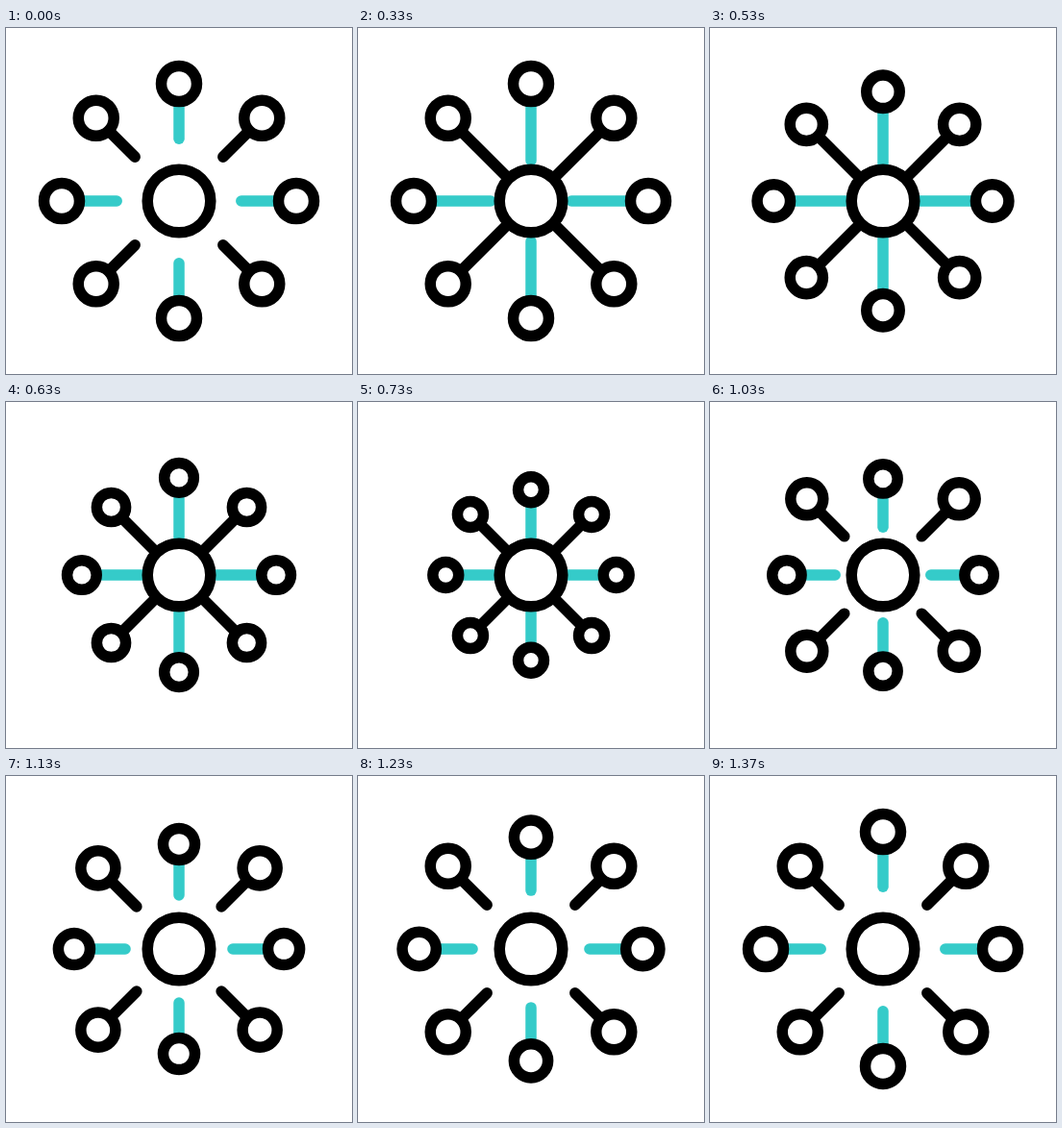
Write an HTML page with a canvas that moves like this. It is 360 by 360 pixels and loops after 1670 ms.

```html
<!DOCTYPE html>
<html lang="en">
<head>
<meta charset="utf-8">
<title>Hub and nodes</title>
<style>
  html, body { margin: 0; width: 100%; height: 100%; overflow: hidden; background: #fff; }
  canvas { display: block; width: 360px; height: 360px; }
</style>
</head>
<body>
<canvas id="stage" width="360" height="360"></canvas>
<script>
const ctx = document.getElementById('stage').getContext('2d');
const LOOP = 1670, STEP = 100 / 3, LAST_STEP = 41;
const BLACK = '#000', TEAL = '#35cbc9';
const STROKE = 11.5, HUB_RADIUS = 32.8, NODE_RADIUS = 18.5, NODE_DISTANCE = 122;
const SPOKE_START = 64.8, SPOKE_REACH = 28, SHRINK_START = 400;

// Times in ms: spokes touch the hub, nodes turn back outwards, everything is at rest.
const straight = { color: TEAL, touch: 460, turn: 860, rest: 1370, shrink: .335 };
const diagonal = { color: BLACK, touch: 360, turn: 795, rest: 1215, shrink: .288 };

const progress = (t, from, to) => Math.min(Math.max((t - from) / (to - from), 0), 1);
const easeInOut = p => p * p * (3 - 2 * p);

// Rises smoothly from 0 to 1, then falls back to 0 with an ease-out.
const pulse = (t, start, full, turn, rest) =>
  easeInOut(progress(t, start, full)) * (1 - progress(t, turn, rest)) ** 1.5;

function ring(x, radius) {
  ctx.beginPath();
  ctx.arc(x, 0, radius, 0, Math.PI * 2);
  ctx.fill();
  ctx.strokeStyle = BLACK;
  ctx.stroke();
}

function arm({ color, touch, turn, rest, shrink }, t) {
  const scale = 1 - shrink * pulse(t, SHRINK_START, turn, turn, rest);
  const spokeStart = SPOKE_START - SPOKE_REACH * pulse(t, 0, touch, turn, rest);
  ctx.beginPath();
  ctx.moveTo(spokeStart, 0);
  ctx.lineTo((NODE_DISTANCE - NODE_RADIUS) * scale, 0);
  ctx.strokeStyle = color;
  ctx.stroke();
  ring(NODE_DISTANCE * scale, NODE_RADIUS * scale);
}

function draw(now) {
  const step = Math.floor((now % LOOP + 4) / STEP);
  const t = Math.min(step, LAST_STEP) * STEP;
  ctx.setTransform(1, 0, 0, 1, 0, 0);
  ctx.fillStyle = '#fff';
  ctx.fillRect(0, 0, 360, 360);
  ctx.translate(180, 180);
  ctx.lineWidth = STROKE;
  ctx.lineCap = 'round';
  for (let i = 0; i < 8; i++) {
    arm(i % 2 ? diagonal : straight, t);
    ctx.rotate(Math.PI / 4);
  }
  ring(0, HUB_RADIUS);
}

const start = performance.now();
function tick() {
  draw(performance.now() - start);
  requestAnimationFrame(tick);
}
tick();
</script>
</body>
</html>
```
